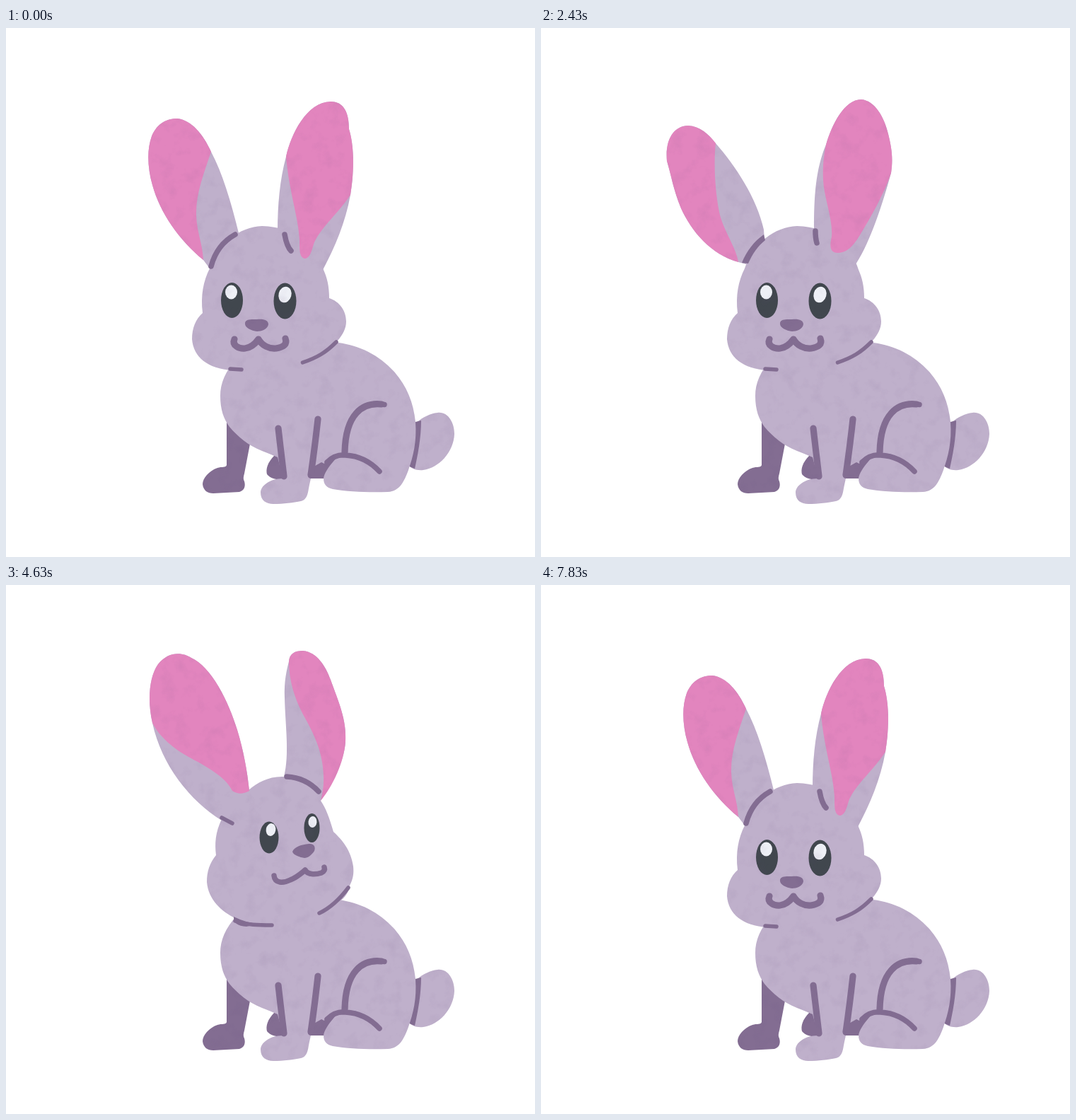
An HTML page without scripts that plays this animation: 748 px wide and 748 px high, repeating every 7.91 s.

```html
<!DOCTYPE html>
<html lang="en">
<head>
<meta charset="utf-8">
<title>Rabbit</title>
<style>
html, body { margin: 0; width: 100%; height: 100%; overflow: hidden; background: #fff; }
svg { display: block; width: 100vw; height: 100vh; }
.fur { fill: #bfb0cb; }
.dark { fill: #836d92; }
.pink { fill: #e285be; }
.eye { fill: #41474e; }
.shine { fill: #eef0f6; }
.line { fill: none; stroke: #836d92; stroke-width: 7.5; stroke-linecap: round; stroke-linejoin: round; }
.thin { stroke-width: 5.5; }
.bold { stroke-width: 9.2; }

/* each pose is switched on for its two turns in the loop */
.pose { opacity: 0; animation: 7.91s step-end infinite; }
#rest { animation-name: rest; }
#turn1 { animation-name: turn1; }
#turn2 { animation-name: turn2; }
#turn3 { animation-name: turn3; }
#look { animation-name: look; }
#lift { animation-name: lift; }
#back1 { animation-name: back1; }
#back2 { animation-name: back2; }
#back3 { animation-name: back3; }
#settle { animation-name: settle; }
@keyframes rest { 0%, 31.98%, 82.17% { opacity: 1 } 1.64%, 51.83% { opacity: 0 } 100% { opacity: 1 } }
@keyframes turn1 { 1.64%, 51.83% { opacity: 1 } 2.9%, 53.09% { opacity: 0 } }
@keyframes turn2 { 2.9%, 53.09% { opacity: 1 } 4.17%, 54.36% { opacity: 0 } }
@keyframes turn3 { 4.17%, 54.36% { opacity: 1 } 5.94%, 55.62% { opacity: 0 } }
@keyframes look { 5.94%, 55.62% { opacity: 1 } 25.28%, 75.47% { opacity: 0 } }
@keyframes lift { 25.28%, 75.47% { opacity: 1 } 26.54%, 76.73% { opacity: 0 } }
@keyframes back1 { 26.54%, 76.73% { opacity: 1 } 27.81%, 78% { opacity: 0 } }
@keyframes back2 { 27.81%, 78% { opacity: 1 } 29.45%, 79.64% { opacity: 0 } }
@keyframes back3 { 29.45%, 79.64% { opacity: 1 } 30.72%, 80.91% { opacity: 0 } }
@keyframes settle { 30.72%, 80.91% { opacity: 1 } 31.98%, 82.17% { opacity: 0 } }
</style>
</head>
<body>
<svg viewBox="0 0 748 748" xmlns="http://www.w3.org/2000/svg">
<defs>
  <!-- faint paper mottling that shifts about ten times a second -->
  <filter id="paper" filterUnits="userSpaceOnUse" x="0" y="0" width="748" height="748" color-interpolation-filters="sRGB">
    <feTurbulence type="fractalNoise" baseFrequency=".05" numOctaves="4" seed="1">
      <animate attributeName="seed" calcMode="discrete" values="1;2;3;4;5;6;7;8" dur=".86s" repeatCount="indefinite"/>
    </feTurbulence>
    <feColorMatrix values="0 0 0 0 .4  0 0 0 0 .3  0 0 0 0 .5  .2 0 0 0 -.1"/>
    <feComposite in2="SourceGraphic" operator="in" result="spots"/>
    <feMerge><feMergeNode in="SourceGraphic"/><feMergeNode in="spots"/></feMerge>
  </filter>

  <g id="headFront">
    <path class="fur" d="M288 340C279 358 275 378 278 403C268 412 263 424 263 440C265 465 285 482 320 484L420 474L469 442C476 434 481 425 481 415C481 400 472 387 457 382C457 365 454 353 449 342C440 310 410 281 362 280C330 281 300 305 288 340Z"/>
    <path class="line thin" d="M419.500 473C440 466 452 459 467 444M317 482L333 483"/>
    <ellipse class="eye" cx="319.500" cy="385" rx="15.500" ry="25"/>
    <ellipse class="eye" cx="394.500" cy="386" rx="16" ry="25.500"/>
    <ellipse class="shine" cx="318.500" cy="373.500" rx="8.500" ry="10"/>
    <ellipse class="shine" cx="394.500" cy="377" rx="9" ry="11.500" transform="rotate(15 394.500 377)"/>
    <path class="dark" d="M338 417C339 411 348 412 355 412C364 411 371 413 371 419C370 426 361 429 355 429C347 428 337 424 338 417Z"/>
    <path class="line bold" d="M323 440C319 449 330 454 338 453C347 452 352 447 357 440C362 449 372 454 382 453C393 451 398 447 395 439"/>
  </g>

  <g id="faceSide">
    <ellipse class="eye" cx="372" cy="357" rx="13.500" ry="22.500"/>
    <ellipse class="eye" cx="432.500" cy="343.500" rx="11" ry="20.500"/>
    <ellipse class="shine" cx="374.500" cy="346" rx="6.800" ry="9" transform="rotate(10 374.500 346)"/>
    <ellipse class="shine" cx="433.500" cy="335" rx="6" ry="8" transform="rotate(5 433.500 335)"/>
    <path class="dark" d="M405 377C408 370 418 367 428 366C436 365 438 371 436 376C432 382 427 386 422 386C416 385 406 382 405 377Z"/>
    <path class="line" d="M379 411C380 422 392 422 402 417C412 413 417 408 423 403C427 411 440 409 446 407C450 405 451 402 450 399"/>
  </g>
  <g id="headLook">
    <path class="fur" d="M305 331C296 350 295 365 297 382C288 393 284 405 284 420C286 445 305 462 324 471L378 482L441 466L471 448C480 442 485 433 486 425C491 415 492 408 491 398C488 375 475 360 463 349C457 328 452 315 445 305C435 285 415 271 390 271C370 271 355 280 343 290Z"/>
    <path class="line thin" d="M324 475C340 481 358 481 376 481M443 464C460 456 472 444 484 428"/>
    <path class="dark" d="M322 469Q340 478 358 479L340 483Q321 482 322 469Z"/>
    <use href="#faceSide"/>
  </g>
  <g id="headLift">
    <path class="fur" d="M312 331C305 345 303 360 303 373C294 385 290 395 290 410C291 435 300 450 315 460C330 467 350 473 372 475L445 461L478 449C488 444 495 435 498 420C502 405 500 395 498 385C494 370 488 360 481 354C477 325 465 300 446 287C430 272 405 267 380 268C365 272 355 276 345 282Z"/>
    <path class="line thin" d="M318 463C335 471 353 473 373 475M444 461C462 452 478 447 490 434"/>
    <path class="dark" d="M444 458C460 448 476 440 493 429C491 443 482 449 470 453L445 464Z"/>
    <use href="#faceSide" x="14" y="-5"/>
  </g>

  <g id="restL">
    <path class="fur" d="M288 340L279 328C245 300 218 262 207 222C200 198 199 172 206 153C214 134 228 128 242 128C262 130 279 150 290 175C306 205 318 245 329 290L325 310Z"/>
    <path class="pink" d="M279 328C245 300 218 262 207 222C200 198 199 172 206 153C214 134 228 128 242 128C262 130 279 150 290 175C280 205 268 235 269 265C270 290 278 305 279 328Z"/>
    <path class="line" d="M290 337C295 318 306 302 324 292"/>
  </g>
  <g id="restR">
    <path class="fur" d="M384 290C384 250 387 215 396 182C403 150 425 105 459 104C478 104 485 120 485 143C492 165 493 200 487 236C480 275 465 310 448 342Z"/>
    <path class="pink" d="M396 182C403 150 425 105 459 104C478 104 485 120 485 143C492 165 493 200 487 236C470 262 447 280 436 303C433 311 431 325 423 326C415 325 415 315 415 300C414 270 400 230 396 182Z"/>
    <path class="line" d="M394 292C396 303 399 311 403 315"/>
  </g>
  <g id="settleL">
    <path class="fur" d="M290 334L279 331C240 320 213 288 198 255C187 228 184 208 178 188C175 155 190 138 208 138C225 139 237 150 247 163C275 195 305 240 315 285L316 300Z"/>
    <path class="pink" d="M279 331C240 320 213 288 198 255C187 228 184 208 178 188C175 155 190 138 208 138C225 139 237 150 247 163C244 190 246 230 252 260C257 285 276 310 279 331Z"/>
    <path class="dark" d="M284 332C291 315 301 302 315 292L317 300C307 308 299 319 293 333Z"/>
  </g>
  <g id="settleR">
    <path class="fur" d="M386 285C386 240 388 200 403 165C411 137 429 101 453 101C472 103 485 125 491 150C496 170 498 185 495 205C480 260 462 310 443 337L390 305Z"/>
    <path class="pink" d="M403 165C411 137 429 101 453 101C472 103 485 125 491 150C496 170 498 185 495 205C485 235 465 270 452 291C445 303 435 318 420 318C408 318 408 308 411 295C413 270 400 240 399 215C398 195 400 180 403 165Z"/>
    <path class="line" d="M388 287Q388 297 390 304"/>
  </g>
  <g id="lookL">
    <path class="fur" d="M305 333C260 305 220 255 207 195C200 165 202 130 215 112C230 93 250 95 262 103C290 115 315 165 327 205C336 235 341 262 344 291L340 320Z"/>
    <path class="pink" d="M207 195C200 165 202 130 215 112C230 93 250 95 262 103C290 115 315 165 327 205C336 235 341 262 344 291C335 296 328 296 320 291C310 270 280 255 258 243C238 232 217 215 207 195Z"/>
    <path class="line thin" d="M305 329L320 337"/>
  </g>
  <g id="lookR">
    <path class="fur" d="M393 271C401 240 395 200 394 160C393 135 397 120 400 108C401 97 408 93 420 93C440 95 452 115 459 134C470 165 482 190 480 222C478 250 462 280 445 305Z"/>
    <path class="pink" d="M400 108C401 97 408 93 420 93C440 95 452 115 459 134C470 165 482 190 480 222C478 250 462 285 445 305C446 300 450 285 449 270C448 235 435 210 420 183C408 160 400 135 400 108Z"/>
    <path class="line" d="M397 271C415 272 430 279 442 292"/>
  </g>
  <g id="liftL">
    <path class="fur" d="M312 331C250 306 190 265 165 220C157 205 154 195 155 185C158 160 180 149 200 150C245 151 276 182 298 211C317 237 336 264 351 283L354 307L340 335Z"/>
    <path class="pink" d="M155 185C158 160 180 149 200 150C245 151 276 182 298 211C317 237 336 264 351 283L354 307C310 295 260 277 225 255C195 238 172 215 155 185Z"/>
    <path class="line" d="M314 329L333 336"/>
  </g>
  <g id="liftR">
    <path class="fur" d="M380 267C360 240 346 205 347 168C347 130 365 90 398 90C425 92 440 120 444 150C449 180 451 205 452 240C452 260 450 275 446 287L430 290Z"/>
    <path class="pink" d="M347 168C347 130 365 90 398 90C425 92 440 120 444 150C449 180 451 205 452 240C452 260 450 275 446 287C440 285 438 275 433 267C428 245 412 232 398 216C380 200 363 185 347 168Z"/>
    <path class="line" d="M382 268C410 266 425 274 439 286"/>
  </g>
</defs>

<g filter="url(#paper)">
  <g id="body">
    <path class="dark" d="M312 556L312 618C311 622 305 620 299 622C287 626 278 637 278 645C279 654 285 658 293 658L330 656C337 654 339 648 337 641C335 637 336 634 337 630L345 588L350 570Z"/>
    <path class="dark" d="M379 605C370 614 367 624 369 631C374 637 382 639 390 638L398 637L392 600Z"/>
    <path class="fur" d="M580 558C590 550 600 545 610 544C625 542 634 558 634 574C633 600 612 622 590 625C580 626 574 623 570 619Z"/>
    <path class="dark" d="M575 558L587 555C587 580 582 605 578 623C574 622 571 620 567 618Z"/>
    <path class="fur" d="M326 468C310 485 303 503 303 520C303 540 308 553 316 564C328 578 342 590 362 598C370 601 377 604 384 607L392 637C372 637 360 648 360 657C360 668 368 673 378 673C392 673 407 671 417 669C427 667 427 655 429 646L431 637L449 637C449 645 453 650 462 652C485 656 515 657 540 656C557 655 563 641 569 625C576 605 581 585 579 557C576 529 567 507 549 486C527 462 500 449 470 445L440 430L345 440Z"/>
    <path class="dark" d="M427 634Q428 637 432 637L449 637C450 630 455 622 462 614L470 604C460 606 454 610 450 616L446 614L432 622Z"/>
    <path class="line bold" d="M385 566L388 592L393 634M441 553Q437 590 431 632M479 600C480 545 505 529 531 532"/>
    <path class="line" d="M454 614C462 606 470 603 480 604C500 605 515 613 528 627M479 600L478 604M532 532L535 532.500"/>
  </g>

  <g class="pose" id="rest">
    <use href="#headFront"/><use href="#restL"/><use href="#restR"/>
  </g>
  <g class="pose" id="turn1">
    <g transform="translate(10 -4)">
      <use href="#headFront"/>
      <use href="#settleL" transform="rotate(-18 300 318)"/>
      <use href="#settleR" transform="rotate(-10 415 310)"/>
    </g>
  </g>
  <g class="pose" id="turn2">
    <g transform="translate(-6 4)">
      <use href="#headLift"/>
      <use href="#liftL" transform="rotate(-20 333 318)"/>
      <use href="#liftR" transform="rotate(-10 415 275)"/>
    </g>
  </g>
  <g class="pose" id="turn3">
    <use href="#headLift"/>
    <use href="#liftL" transform="rotate(-9 333 318)"/>
    <use href="#liftR" transform="translate(0 -22) scale(1 1.080)"/>
  </g>
  <g class="pose" id="look">
    <use href="#headLook"/><use href="#lookL"/><use href="#lookR"/>
  </g>
  <g class="pose" id="lift">
    <use href="#headLift"/><use href="#liftL"/><use href="#liftR"/>
  </g>
  <g class="pose" id="back1">
    <use href="#headLook"/>
    <g transform="translate(0 -26.500) scale(1 1.090)"><use href="#lookL"/><use href="#lookR"/></g>
  </g>
  <g class="pose" id="back2">
    <g transform="translate(8 -5)">
      <use href="#headFront"/>
      <use href="#restL" transform="rotate(6 305 315)"/>
      <use href="#restR" transform="rotate(4 418 310)"/>
    </g>
  </g>
  <g class="pose" id="back3">
    <use href="#headFront"/>
    <use href="#settleL" transform="rotate(-20 300 318)"/>
    <use href="#settleR" transform="rotate(-8 415 310)"/>
  </g>
  <g class="pose" id="settle">
    <use href="#headFront"/><use href="#settleL"/><use href="#settleR"/>
  </g>
</g>
</svg>
</body>
</html>
```
